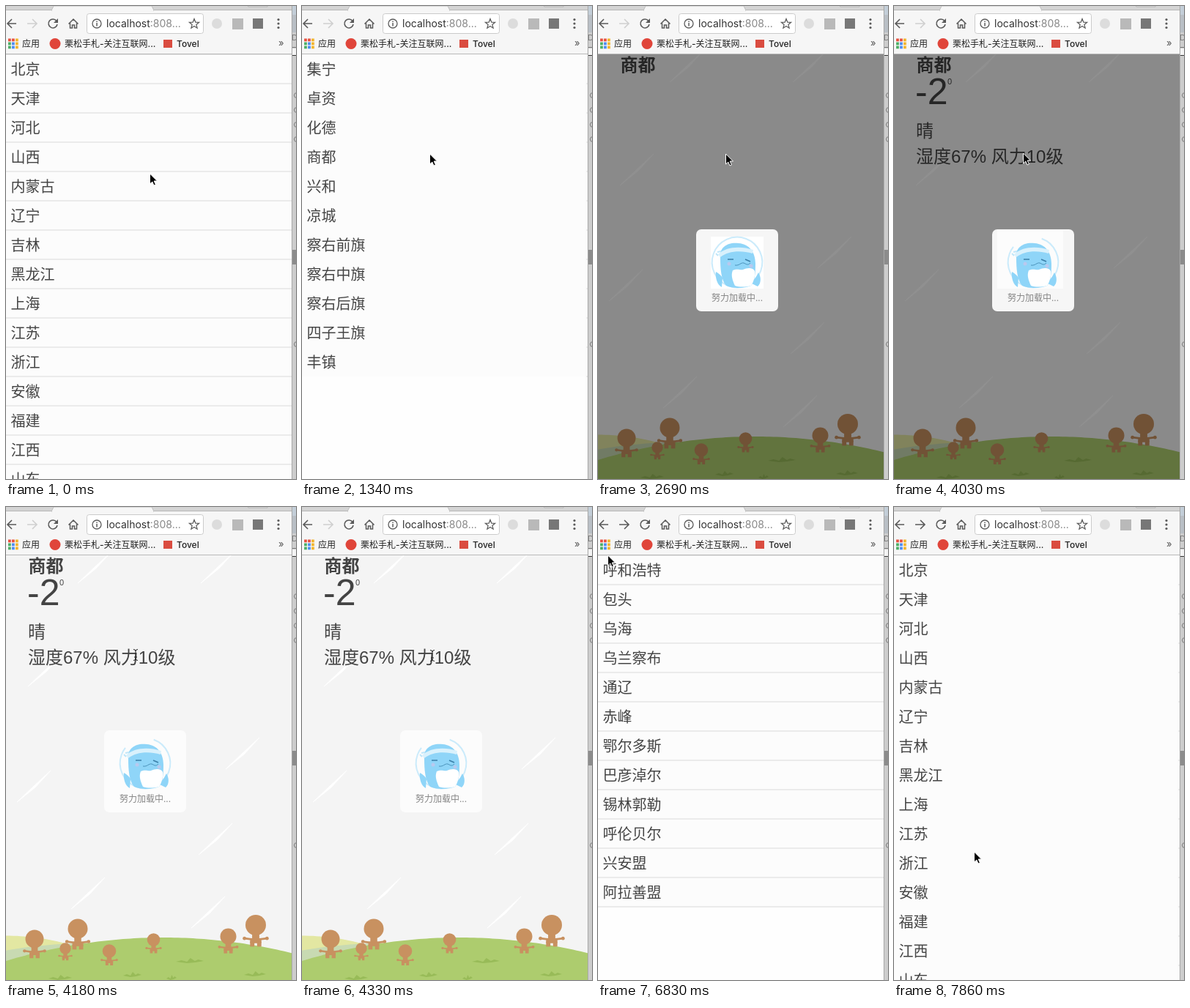
An HTML page with a canvas that plays this animation: 396x646 px, repeating every 8000 ms.

```html
<!DOCTYPE html>
<html lang="zh-CN">
<head>
<meta charset="utf-8">
<title>天气</title>
<style>
html, body { margin: 0; width: 100%; height: 100%; overflow: hidden; background: #fff; }
canvas { display: block; }
</style>
</head>
<body>
<canvas id="stage" width="396" height="646"></canvas>
<script>
const ctx = document.getElementById('stage').getContext('2d');
const LOOP = 8000, STEPS = 54;
const CJK = '"Noto Sans CJK SC", "Noto Sans CJK", sans-serif';
const UI = 'Inter, ' + CJK;
const ARIAL = '"Liberation Sans", ' + CJK;

const LISTS = {
  province: '北京 天津 河北 山西 内蒙古 辽宁 吉林 黑龙江 上海 江苏 浙江 安徽 福建 江西 山东'.split(' '),
  city: '呼和浩特 包头 乌海 乌兰察布 通辽 赤峰 鄂尔多斯 巴彦淖尔 锡林郭勒 呼伦贝尔 兴安盟 阿拉善盟'.split(' '),
  county: '集宁 卓资 化德 商都 兴和 凉城 察右前旗 察右中旗 察右后旗 四子王旗 丰镇'.split(' ')
};

// [first step, page, row lines visible]
const PAGES = [
  [0, 'province', true], [4, 'city', false], [5, 'city', true], [9, 'county', false],
  [10, 'weather'], [37, 'county', false], [38, 'county', true],
  [43, 'city', false], [44, 'city', true], [51, 'province', false]
];

// [step, x, y] of the pointer tip
const PATH = [
  [0, 196, 229], [1, 199, 231], [5, 199, 231], [8, 174, 203], [9, 174, 202], [26, 174, 202],
  [27, 176, 201], [29, 178, 203], [30, 172, 196], [33, 14, 64], [34, 6, 24], [44, 6, 24],
  [46, 13, 66], [47, 13, 66], [49, 6, 24], [51, 6, 24], [52, 40, 170], [53, 109, 471]
];

function rect(x, y, w, h, color) {
  ctx.fillStyle = color;
  ctx.fillRect(x, y, w, h);
}

function round(x, y, w, h, r, fill, stroke) {
  ctx.beginPath();
  ctx.roundRect(x, y, w, h, r);
  paint(fill, stroke);
}

function paint(fill, stroke, width = 1) {
  if (fill) { ctx.fillStyle = fill; ctx.fill(); }
  if (stroke) { ctx.strokeStyle = stroke; ctx.lineWidth = width; ctx.stroke(); }
}

function circle(x, y, r, fill, stroke, width) {
  ctx.beginPath();
  ctx.arc(x, y, r, 0, Math.PI * 2);
  paint(fill, stroke, width);
}

function shape(d, fill, stroke, width = 1) {
  const p = new Path2D(d);
  if (fill) { ctx.fillStyle = fill; ctx.fill(p); }
  if (stroke) { ctx.strokeStyle = stroke; ctx.lineWidth = width; ctx.stroke(p); }
}

function text(s, x, y, font, color) {
  ctx.font = font;
  ctx.fillStyle = color;
  ctx.fillText(s, x, y);
}

function drawEdge() {
  rect(390, 0, 6, 646, '#cdcdcd');
  rect(390, 0, 6, 12, '#c3ced8');
  rect(390, 12, 6, 24, '#b9bfc5');
  text('D', 390, 47, '11px ' + ARIAL, '#777');
  rect(390, 56, 6, 1, '#777');
  rect(391, 58, 5, 9, '#f4f4f4');
  rect(390, 67, 6, 1, '#333');
  rect(390, 333, 6, 20, '#8c8c8c');
  for (const y of [122, 142, 162, 182, 462]) circle(397, y, 3.5, null, '#777');
  rect(390, 0, 1, 646, '#a9a9a9');
}

function drawToolbar(k) {
  rect(0, 0, 390, 66, '#f6f6f6');
  rect(0, 0, 390, 6, '#d4d4d4');
  rect(0, 5, 390, 1, '#b8b8b8');
  shape('M62 6L65 0H199L202 6Z', '#f6f6f6', '#bdbdbd');
  rect(63, 5, 138, 2, '#f6f6f6');
  shape('M328 -2L331 1H357V-2', '#dedede', '#b5b5b5');

  const hover = (k >= 34 && k <= 44) || (k >= 49 && k <= 50);
  if (hover) round(-6, 12, 27, 25, 3, '#dfdfdf');
  const dark = '#5a5a5a';
  shape('M14 24H2M8 18L2 24L8 30', null, dark, 1.6);
  shape('M29 24H42M36 18L42 24L36 30', null, k >= 37 ? dark : '#cfcfcf', 1.6);
  shape('M69 20.5A6 6 0 1 0 70 25', null, dark, 1.6);
  shape('M71 17V23H65Z', dark);
  shape('M85.5 24.5L92 18L98.5 24.5M87.5 23.5V30H90.5V26H93.5V30H96.5V23.5', null, dark, 1.5);

  round(110.5, 10.5, 159, 27, 3, '#fff', '#cbcbcb');
  circle(124, 24, 6, null, dark, 1.3);
  rect(123.3, 23, 1.5, 4.5, dark);
  rect(123.3, 20.5, 1.5, 1.5, dark);
  text('localhost', 137, 29, '14px ' + UI, '#333');
  text(':808...', 137 + ctx.measureText('localhost').width, 29, '14px ' + UI, '#888');
  ctx.beginPath();
  for (let i = 0; i < 10; i++) {
    const a = i * Math.PI / 5 - Math.PI / 2, r = i % 2 ? 3 : 7;
    ctx.lineTo(257 + r * Math.cos(a), 24.5 + r * Math.sin(a));
  }
  ctx.closePath();
  paint(null, dark, 1.2);

  circle(288, 24, 7, '#dcdcdc');
  rect(309, 17, 15, 15, '#b9b9b9');
  rect(337, 17, 14, 14, '#777');
  for (const y of [18.5, 24, 29.5]) circle(372, y, 1.6, dark);

  const dots = ['#e8503f', '#e8503f', '#f2b52e', '#4caf66', '#4c8df0', '#f2b52e', '#4caf66', '#4c8df0', '#f2b52e'];
  dots.forEach((c, i) => rect(3 + i % 3 * 5, 44.5 + Math.floor(i / 3) * 5, 3.8, 3.8, c));
  const font = '500 12px ' + UI;
  text('应用', 22, 56, font, '#222');
  circle(67, 51.5, 7.5, '#e0453a');
  text('栗松手札-关注互联网...', 80, 56, font, '#222');
  rect(215, 46, 12, 11, '#da4c40');
  text('Tovel', 233, 56, font, '#222');
  text('»', 372, 55, '13px ' + UI, '#555');
  rect(0, 65, 390, 1, '#b9b9b9');
}

function drawList(rows, lines) {
  rect(0, 66, 390, 580, '#fefefe');
  rect(0, 66, 390, rows.length * 40, '#fcfcfc');
  rows.forEach((name, i) => {
    const y = 66 + i * 40;
    text(name, 6.5, y + 27.5, '500 20px ' + CJK, '#444');
    rect(lines ? 0 : 388, y + 39, lines ? 390 : 2, 2, '#ebebeb');
  });
  if (lines) rect(0, 66, 390, 1, '#e4e4e4');
}

function hill(top, peak, bend, color, end) {
  ctx.beginPath();
  ctx.moveTo(0, 646);
  for (let x = 0; x <= end; x += 5) ctx.lineTo(x, top + bend * (x - peak) ** 2);
  ctx.lineTo(end, 646);
  paint(color);
}

function drawTree([x, y, r]) {
  const c = '#c89160';
  circle(x, y, r, c);
  const sy = y + r * 1.45;
  ctx.beginPath();
  ctx.moveTo(x - r * 1.1, sy - r * 0.15);
  ctx.quadraticCurveTo(x, sy + r * 0.05, x + r * 1.1, sy - r * 0.15);
  paint(null, c, r * 0.2);
  circle(x - r * 1.1, sy - r * 0.15, r * 0.17, c);
  circle(x + r * 1.1, sy - r * 0.15, r * 0.17, c);
  rect(x - r * 0.35, y + r * 0.85, r * 0.7, r * 0.9, c);
  rect(x - r * 0.55, y + r * 1.35, r * 1.1, r * 0.4, c);
  rect(x - r * 0.55, y + r * 1.6, r * 0.42, r * 0.5, c);
  rect(x + r * 0.13, y + r * 1.6, r * 0.42, r * 0.5, c);
}

function drawScene() {
  rect(0, 66, 390, 580, '#f4f4f4');
  const streaks = [[98, 104], [266, 104], [30, 245], [15, 403], [300, 358], [263, 475], [89, 549], [253, 575]];
  for (const [x, y] of streaks)
    shape(`M${x} ${y}L${x + 22} ${y - 21}L${x + 46} ${y - 43}L${x + 25} ${y - 20}Z`, '#fff', '#fff', 0.8);
  hill(585.5, 0, 0.0016, '#e3e7a2', 130);
  hill(596, 110, 0.0008, '#c8dab2', 130);
  hill(588, 215, 0.00069, '#adcc6e', 390);
  for (const [x, y, w] of [[232, 619, 38], [58, 642, 32], [160, 638, 25], [219, 642, 14], [325, 637, 30]]) {
    const u = w / 5;
    shape(`M${x} ${y + 2}L${x + u} ${y}L${x + 2 * u} ${y + 2}L${x + 2.6 * u} ${y - 3}L${x + 3.4 * u} ${y + 1}
      L${x + 4 * u} ${y - 1}L${x + w} ${y + 1}L${x + 3.5 * u} ${y + 3}L${x + 2 * u} ${y + 4}Z`, '#98bb58');
  }
  [[39, 590, 12.5], [98, 576, 13.5], [81, 603, 7.7], [141, 606.5, 9.3], [201.5, 591, 8.8], [303.5, 586.5, 11], [341, 571, 14]].forEach(drawTree);
}

function drawWhale() {
  const blue = '#8fd5f8';
  shape('M169 384C163 381 160 372 161 363C165 365 168 368 170 371Z', blue);
  shape('M208 378C214 374 217 368 219 364C223 370 223 379 218 383Z', blue);
  shape('M167 344C165 329 178 322 192 324C207 325 215 337 215 352C215 366 214 376 209 382C200 386 183 386 175 382C168 374 167 358 167 344Z', blue);
  shape('M164 339C174 329 194 327 212 333L211 338C194 333 177 335 167 343Z', '#d9f1fc');
  shape('M161 338L164 341M168 335L163 336', null, '#bfe6f9', 2);
  shape('M184 361C190 358 194 361 198 360C204 357 212 357 214 362C215 369 212 378 209 382C201 384 193 384 187 382C184 375 181 368 184 361Z', '#fff');
  shape('M177 346H185M201 346L208 349', null, '#3b7fa8', 1.6);
  shape('M187 354C193 355 195 350 199 351C202 352 204 355 208 351', null, '#4b93bb', 1);
  circle(179, 352, 2.5, '#b9c9ee');
  circle(209, 355, 2.5, '#b9c9ee');
}

function drawLoader(k, veiled) {
  round(134, 305, 112, 112, 7, veiled ? '#f6f6f6' : '#fcfcfc');
  if (veiled) k < 26 ? rect(154, 315, 72, 71, '#fff') : rect(141, 306, 90, 80, '#fcfcfc');
  const part = ((Math.min(k, 26) + 2) % 10) / 10 || 1;
  const start = -70 * Math.PI / 180;
  ctx.beginPath();
  ctx.arc(190, 350, 34.3, start, start + part * Math.PI * 2);
  paint(null, '#cbebfb', 2);
  drawWhale();
  text('努力加载中...', 155, 403, '12px ' + CJK, '#858585');
}

function drawWeather(k) {
  drawScene();
  const ink = '#434343';
  text('商都', 30.5, 89, 'bold 24px ' + CJK, ink);
  if (k >= 26) {
    text('-2', 29, 134, '50px ' + ARIAL, ink);
    text('0', 73, 107, '11px ' + ARIAL, ink);
    text('晴', 30, 179, '24px ' + ARIAL, ink);
    text('湿度67% 风力10级', 30, 214, '24px ' + ARIAL, ink);
  }
  const veiled = k < 28;
  if (veiled) rect(0, 66, 390, 580, 'rgba(0,0,0,0.434)');
  if (k < 30) drawLoader(k, veiled);
}

function drawPointer(k) {
  const i = PATH.findLastIndex(p => p[0] <= k);
  const a = PATH[i], b = PATH[i + 1] || a;
  const f = b === a ? 0 : (k - a[0]) / (b[0] - a[0]);
  ctx.save();
  ctx.translate(a[1] + (b[1] - a[1]) * f, a[2] + (b[2] - a[2]) * f);
  if (k >= 28 && k <= 30) {
    shape('M-3 -7.5Q0 -7.5 0 -5V5Q0 7.5 -3 7.5M3 -7.5Q0 -7.5 0 -5M3 7.5Q0 7.5 0 5M-2 3H2', null, '#222', 1);
  } else {
    shape('M0.5 0V14L3.8 11L6 16L8.4 15L6.2 10H10.5Z', '#000', '#fff', 1);
  }
  ctx.restore();
}

function draw(now) {
  const k = Math.floor((now % LOOP) / LOOP * STEPS);
  const [, page, lines] = PAGES.findLast(p => p[0] <= k);
  ctx.save();
  ctx.beginPath();
  ctx.rect(0, 66, 390, 580);
  ctx.clip();
  if (page === 'weather') drawWeather(k);
  else drawList(LISTS[page], lines);
  ctx.restore();
  drawToolbar(k);
  drawEdge();
  drawPointer(k);
}

let begin;
function tick(now) {
  begin ??= now;
  draw(now - begin);
  requestAnimationFrame(tick);
}
draw(0);
requestAnimationFrame(tick);
</script>
</body>
</html>
```
